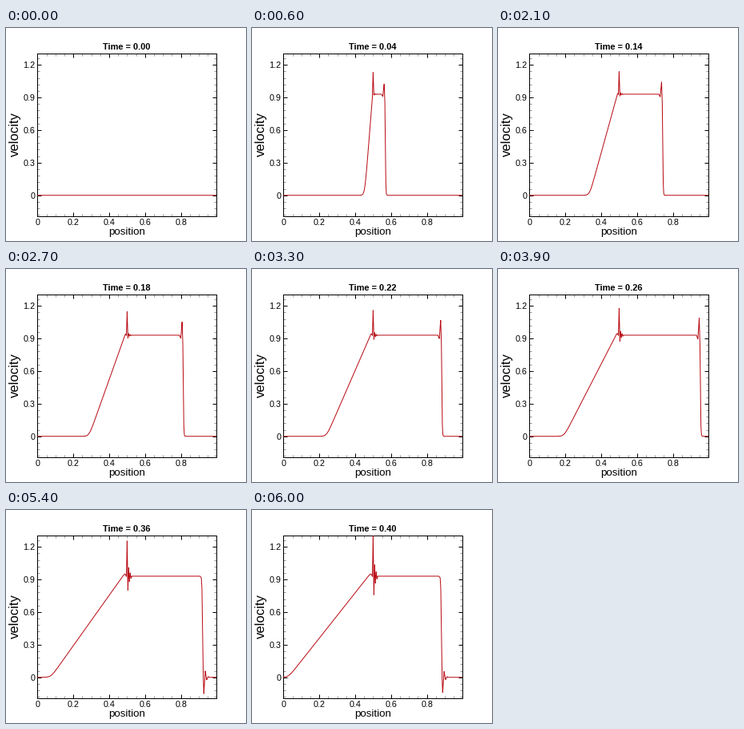
Animation of 300 by 267 pixels, one loop 6.3 s. Source, as a matplotlib script:

```python
import numpy as np
import matplotlib.pyplot as plt
from matplotlib.animation import FuncAnimation
from matplotlib.ticker import MultipleLocator

W, H, DPI = 300, 267, 72
LEFT, RIGHT, TOP, BOTTOM = 39.4, 263.4, 32.4, 236.45
FRAMES, STEP = 21, 0.02
SOUND, SHOCK, PLATEAU = 1.183, 1.752, 0.93
T_WALL = 0.285

plt.rcParams["font.family"] = "Liberation Sans"
plt.rcParams["path.simplify"] = False
x = np.linspace(0, 1, 3001)


def shape(origin, *knots):
    """Piecewise linear curve given relative to a moving origin."""
    dx, y = zip(*knots)
    return np.interp(x - origin, dx, y)


def rarefaction(t):
    w = 0.006 * (t / 0.08) ** (1 / 3)
    slope = 1 / (1.2 * t)
    d = x - (0.5 - SOUND * t)
    ramp = slope * w * np.logaddexp(0, d / w)
    cap = shape(0.5, (-0.012, 0.952), (-0.004, 0.928), (0, PLATEAU))
    k = 0.006  # softness of the corner
    return -k * np.logaddexp(-ramp / k, -cap / k)


def shock(t):
    xs = 0.5 + SHOCK * t
    peak = 0.095 + 0.045 * (t / 0.22) ** 2
    return shape(xs, (-0.024, PLATEAU), (-0.016, PLATEAU - 0.22 * peak),
                 (-0.0085, PLATEAU + peak), (-0.0045, 0.85), (0.001, 0.1),
                 (0.004, 0.012), (0.009, 0))


def reflected(t):
    xr = 0.983 - (t - 0.3)
    dip = np.interp(t, [0.30, 0.32, 0.34, 0.36, 0.40],
                    [0.17, 0.21, 0.19, 0.15, 0.14])
    return shape(xr, (-0.016, PLATEAU), (-0.009, 0.915), (-0.0055, 0.82),
                 (0.002, 0), (0.005, -dip), (0.013, 0.38 * dip),
                 (0.021, -0.15 * dip), (0.029, 0.04 * dip), (0.036, 0))


def contact(t):
    """Growing spike at the diaphragm with ringing behind it."""
    s = t / 0.4
    spike = 0.2 + 0.17 * s ** 3
    ring = 0.008 + 0.165 * s ** 2.8
    tail = [(0.0043 * k, (-1) ** k * ring * 0.62 ** (k - 1)) for k in range(1, 6)]
    return shape(0.5, (-0.004, 0), (0, spike), *tail, (0.026, 0))


def velocity(t):
    if t == 0:
        return np.zeros_like(x)
    right = shock(t) if t < T_WALL else reflected(t)
    return np.where(x < 0.5, rarefaction(t), right) + contact(t)


fig = plt.figure(figsize=(W / DPI, H / DPI), dpi=DPI, facecolor="white")
ax = fig.add_axes([LEFT / W, 1 - BOTTOM / H, (RIGHT - LEFT) / W, (BOTTOM - TOP) / H])
ax.set(xlim=(0, 1), ylim=(-0.196, 1.301))
ax.xaxis.set_major_locator(MultipleLocator(0.2))
ax.xaxis.set_minor_locator(MultipleLocator(0.05))
ax.yaxis.set_major_locator(MultipleLocator(0.3))
ax.yaxis.set_minor_locator(MultipleLocator(0.06))
ax.tick_params(which="both", direction="in", top=True, right=True,
               labelbottom=False, labelleft=False)
ax.tick_params(which="major", length=5, width=1)
ax.tick_params(which="minor", length=3, width=0.6, color="#555555")
for spine in ax.spines.values():
    spine.set_linewidth(1)


def label(px, py, text, size, **kw):
    kw = {"ha": "center", "va": "baseline", **kw}
    return fig.text(px / W, 1 - py / H, text, size=size, **kw)


for v in (0, 0.2, 0.4, 0.6, 0.8):
    label(LEFT + 224 * v, 247.4, f"{v:g}", 10.8)
for v in (0, 0.3, 0.6, 0.9, 1.2):
    label(36.3, 213.6 - 136.3 * v, f"{v:g}", 10.8, ha="right")
label(151.5, 259.5, "position", 13.4)
label(18.5, 133, "velocity", 16.6, rotation=90, ha="right", va="center",
      rotation_mode="default")

title = label(150.3, 27, "", 11, weight="bold")
line, = ax.plot(x, np.zeros_like(x), color="#b80c14", lw=1, zorder=3)


def update(i):
    t = i * STEP
    line.set_ydata(velocity(t))
    title.set_text(f"Time = {t:.2f}")
    return line, title


anim = FuncAnimation(fig, update, frames=FRAMES, interval=300,
                     repeat=True, repeat_delay=0)
plt.show()
```
